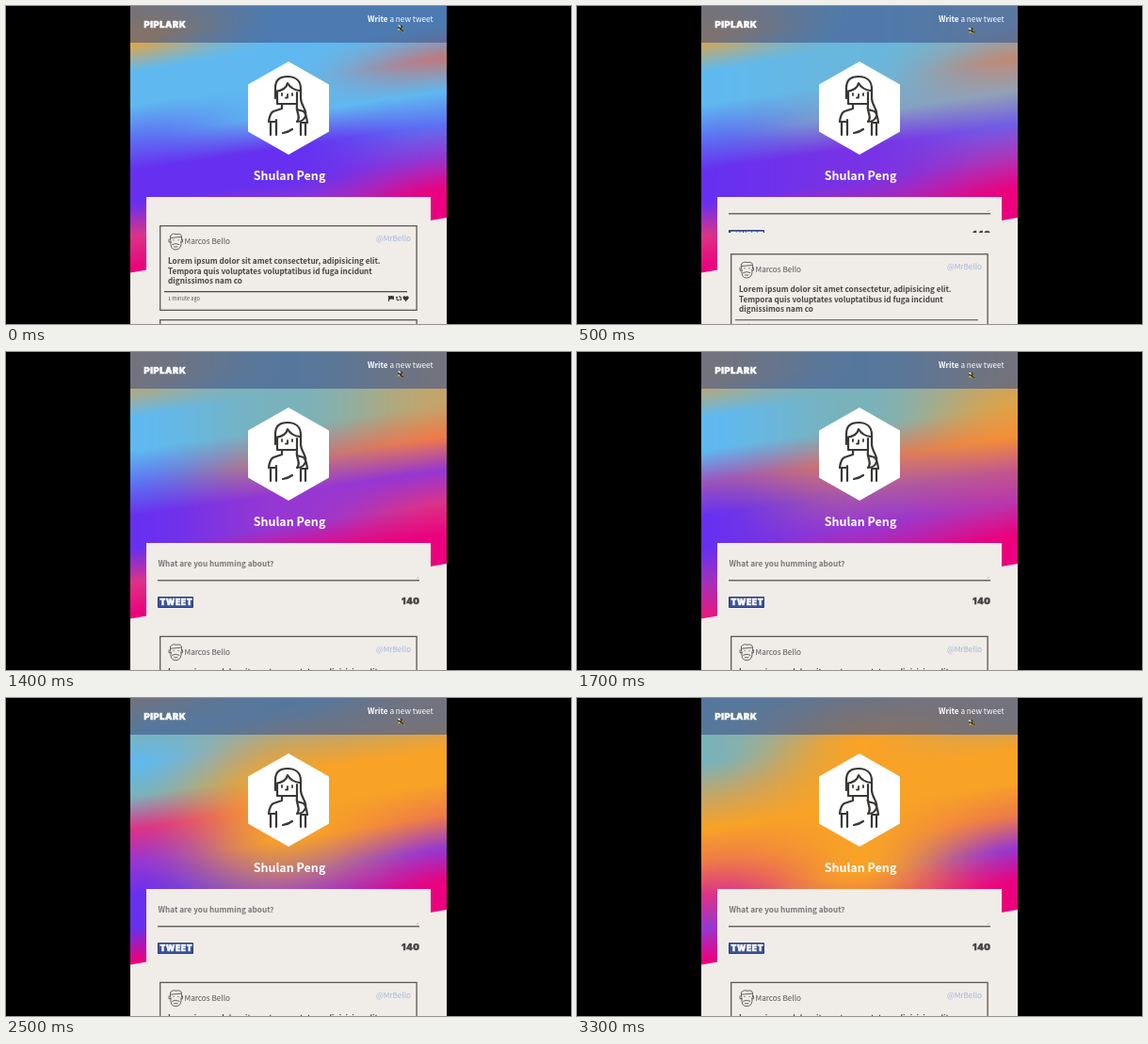
An HTML page with a canvas for the animation above (3400 ms loop, 600x338 px).

```html
<!DOCTYPE html>
<html lang="en">
<head>
<meta charset="utf-8">
<title>Profile page</title>
<style>
  html, body { margin: 0; width: 100%; height: 100%; overflow: hidden; background: #000; }
  canvas, svg { position: absolute; top: 0; left: 0; }
  canvas { left: 132px; }
  text { font: 300 8.2px "Noto Sans CJK JP", "Noto Sans CJK SC", "Noto Sans CJK", "Open Sans", sans-serif; fill: #555; }
  .bold { font-weight: 600; }
  .block { font: 900 9.3px Inter, "Open Sans", sans-serif; stroke-width: .5; letter-spacing: .6px; }
  .light { fill: #fff; }
  .dark { fill: #444; }
  .end { text-anchor: end; }
  .ink { fill: none; stroke: #3a3836; stroke-width: 2.2; stroke-linecap: round; stroke-linejoin: round; }
  .thin { stroke: #555; stroke-width: .9; }
  .box { fill: none; stroke: #5a5755; stroke-width: 1.3; }
</style>
</head>
<body>
<canvas id="sky" width="336" height="286"></canvas>
<svg width="600" height="338" viewBox="0 0 600 338">
  <defs>
    <clipPath id="page"><rect x="132" width="336" height="338"/></clipPath>
    <clipPath id="slot"><rect id="opening" x="150" y="210" width="300" height="1"/></clipPath>
  </defs>
  <g clip-path="url(#page)">
    <path fill="#f0ece8" d="M132 283.5 468 225V338H132Z"/>
    <path fill="#f0ece8" d="M149 203H451V338H149Z"/>

    <path fill="#42548c" fill-opacity=".62" d="M132 0H468V39H132Z"/>
    <text class="block light" x="146.5" y="22.5" stroke="#fff">PIPLARK</text>
    <text class="light end" x="453.5" y="17"><tspan class="bold">Write</tspan> a new tweet</text>
    <g id="pointer">
      <path d="M-4-3 0-1 2-4 1 0 4 4-1 2-3 3-2 0Z" fill="#e8c33a"/>
      <path d="M-3-1 3 3M1-3 0 2" stroke="#222" stroke-width="1.2"/>
      <circle cx="-2" cy="-2" r=".8" fill="#fff"/>
    </g>

    <path fill="#fff" d="M300 59 343 83.5V133.5L300 158 257 133.5V83.5Z"/>
    <g class="ink">
      <path d="M286 98V87C286 79 291 75 299 75C308 75 313 80 313 88V98C313 106 320 110 318 117Q316 123 309 123C314 117 307 113 309 104"/>
      <path d="M286 91C293 90 298 87 299 82Q303 89 312 90M288 92V104H309V92"/>
      <path d="M293 93V95M304 93V95M299 94V97.500H297" stroke-width="1.8"/>
      <path d="M293 105V109L284 112Q280 114 279 123H287M287 121V137M309 110L316 112Q319 115 320 124H313M313 125V137M281 124V137M318 125V137M294 135Q300 134 304 131"/>
    </g>
    <text class="bold light" x="301" y="184.5" text-anchor="middle" style="font-size:12.5px">Shulan Peng</text>

    <g clip-path="url(#slot)">
      <g id="form">
        <text class="bold" x="161.5" y="228" style="fill:#777">What are you humming about?</text>
        <path d="M161 242.700H439" stroke="#6b6663" stroke-width="1.5"/>
        <path d="M436 241 438 239" stroke="#999" stroke-width=".6"/>
        <path d="M161.500 260.500H198.500V271.500H161.500Z" fill="#3d549c" stroke="#2c3d78"/>
        <text class="block light" x="163.5" y="269" stroke="#fff" style="font-size:8.6px">TWEET</text>
        <text class="block dark end" x="439.5" y="268" stroke="#444">140</text>
      </g>
    </g>

    <g id="feed">
      <rect class="box" x="163.7" y="233.7" width="272.4" height="89.6"/>
      <path class="ink thin" d="M174.500 249V244Q177 241 181 242.500 187 241 186.500 247V249M174.500 246.500 186 245.500M173 248V251H175M187.500 248V251H186M175 250Q174 259 180 259 187 259 186 250M176.500 253.500Q180 251.500 184 253.500M178.500 256H182M178 248.500V249M183 248.500V249"/>
      <text x="189.5" y="253">Marcos Bello</text>
      <text class="end" x="430" y="250" style="fill:#a5b8de">@MrBello</text>
      <text class="bold dark" x="172" y="274">Lorem ipsum dolor sit amet consectetur, adipisicing elit.</text>
      <text class="bold dark" x="172" y="284.5">Tempora quis voluptates voluptatibus id fuga incidunt</text>
      <text class="bold dark" x="172" y="295">dignissimos nam co</text>
      <path d="M168 303.700H426" stroke="#4a4745" stroke-width="1.2"/>
      <text x="172" y="313" style="font-size:5.6px">1 minute ago</text>
      <path fill="#333" d="M406 308H407V314H406ZM407 308.400Q409 307.600 412 308.500V312Q409 311 407 312ZM424.600 314 421.800 311C420.400 308.800 423.400 307 424.600 309C425.800 307 428.800 308.800 427.400 311Z"/>
      <path fill="none" stroke="#333" d="M414 310 415 309 416 310M415 309V312.500H417.500M417 309H419.200V312.500M418.200 311.800 419.200 312.800 420.200 311.800"/>
      <rect class="box" x="163.7" y="333.7" width="272.4" height="89.6"/>
    </g>
  </g>
</svg>
<script>
const LOOP = 3400, STEP = 100;
const WIDTH = 336, HEIGHT = 286, SLOPE = 0.15, DEPTH = 280;
const $ = id => document.getElementById(id);
const ctx = $('sky').getContext('2d');

const paint = {
  o: [248, 162, 38], b: [95, 185, 240], u: [92, 115, 242], p: [103, 48, 240],
  v: [150, 55, 210], m: [235, 0, 125], k: [220, 50, 135], t: [122, 178, 186],
  g: [195, 165, 105], s: [238, 122, 72], r: [190, 120, 125]
};
// Time, then the bands down the left, middle and right of the sky.
const moods = [
  [0, 'gobbuppkm', 'bbbbbppvm', 'bbbrbuvmm'],
  [1400, 'ggbbuppkm', 'ttttrvvmm', 'ggggsvkmm'],
  [2000, 'ggbbkpppk', 'ttttsrvvm', 'gggoosvmm'],
  [2500, 'gtbtkvppm', 'ttgooorvm', 'gggoosvmm'],
  [3300, 'tttgoskvm', 'tgooooosk', 'gggoosvmm']
];

const clamp = x => Math.max(0, Math.min(1, x));
const smooth = x => x * x * (3 - 2 * x);
const mix = (a, b, f) => a.map((n, i) => n + (b[i] - n) * f);

function drawSky(t) {
  let i = 0;
  while (i < moods.length - 2 && moods[i + 1][0] <= t) i++;
  const [from, to] = [moods[i], moods[i + 1]];
  const blend = clamp((t - from[0]) / (to[0] - from[0]));
  const columns = [1, 2, 3].map(c =>
    [...from[c]].map((key, row) => mix(paint[key], paint[to[c][row]], blend)));

  for (let x = 0; x < WIDTH; x += 2) {
    const across = x / WIDTH * 2, c = Math.floor(across), f = smooth(across - c);
    const top = -SLOPE * x;
    const bands = ctx.createLinearGradient(0, top, 0, top + DEPTH);
    columns[c].forEach((color, row) =>
      bands.addColorStop(row / 8, `rgb(${mix(color, columns[c + 1][row], f).map(Math.round)})`));
    ctx.fillStyle = bands;
    ctx.fillRect(x, 0, 2, HEIGHT);
  }
}

function draw(t) {
  drawSky(t);
  const open = 0.5 - Math.cos(Math.PI * clamp((t - 316) / 400)) / 2;
  const shift = 68.7 * open;
  $('feed').setAttribute('transform', `translate(0 ${shift})`);
  $('form').setAttribute('transform', `translate(0 ${39 * (open - 1)})`);
  $('opening').setAttribute('height', 1 + shift);
  const flutter = Math.cos(t / 1400 * 2 * Math.PI);
  $('pointer').setAttribute('transform', `translate(419.3 ${25 - 1.5 * flutter}) rotate(${10 * flutter})`);
}

function tick(now) {
  draw(Math.floor(now % LOOP / STEP) * STEP);
  requestAnimationFrame(tick);
}
draw(0);
requestAnimationFrame(tick);
</script>
</body>
</html>
```
